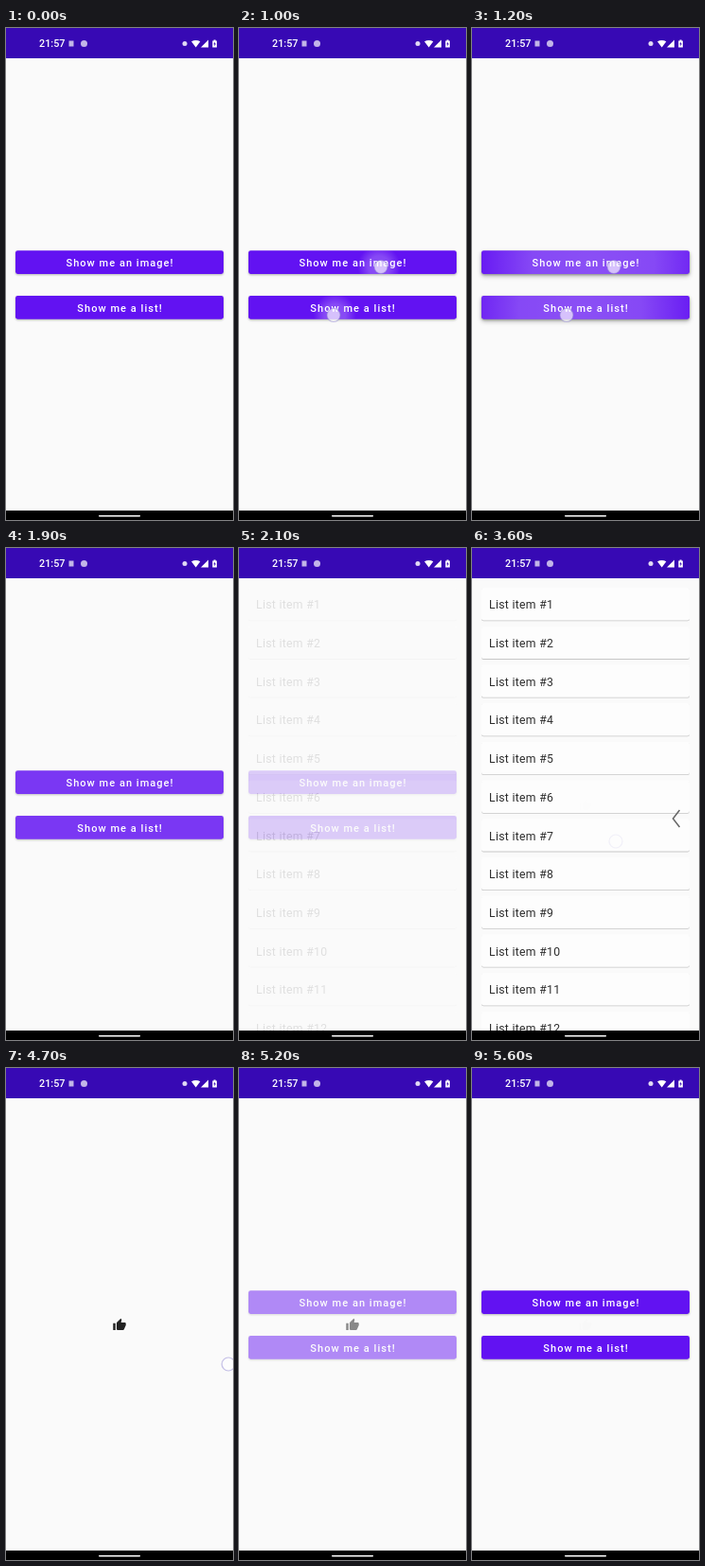
Animation of 240x520 px, one loop 5700 ms. Source, as an HTML page:

```html
<!DOCTYPE html>
<html lang="en">
<head>
<meta charset="utf-8">
<title>Navigation demo</title>
<style>
  html, body { margin: 0; width: 100%; height: 100%; overflow: hidden; background: #fafafa; }
  svg { display: block; width: 240px; height: 520px; font-family: Roboto, sans-serif; }
  .label { font-size: 11.02px; font-weight: 500; letter-spacing: 1.03px; fill: #fff; }
  .item { font-size: 12.24px; letter-spacing: .3px; fill: #222; }
  .rest { filter: blur(1px); opacity: .28; }
  .raised { filter: blur(2.5px); }
  .edge { filter: blur(.7px); opacity: .22; }
  .touch { fill: rgba(255, 255, 255, .65); stroke: rgba(140, 130, 210, .5); stroke-width: 1.2; }
</style>
</head>
<body>
<svg viewBox="0 0 240 520">
  <defs id="defs"></defs>
  <rect width="240" height="520" fill="#fafafa"/>
  <g id="home"></g>
  <g id="image">
    <path transform="translate(112.66 264.2) scale(.612)" fill="#222" d="M1 21h4V9H1v12zm22-11c0-1.1-.9-2-2-2h-6.31l.95-4.57.03-.32c0-.41-.17-.79-.44-1.06L14.17 1 7.59 7.59C7.22 7.95 7 8.45 7 9v10c0 1.1.9 2 2 2h9c.83 0 1.54-.5 1.84-1.22l3.02-7.05c.09-.23.14-.47.14-.73v-2z"/>
  </g>
  <g id="list"></g>
  <g id="pointers"></g>
  <path id="arrow" d="M219.5 277l-7 9 7 9" fill="none" stroke="#666" stroke-width="1.5"/>

  <rect width="240" height="32" fill="#3709b4"/>
  <g fill="#fff">
    <text x="35" y="20.4" font-size="10.8" font-weight="500">21:57</text>
    <rect x="66.5" y="13.5" width="5" height="6" opacity=".7"/>
    <circle cx="82.5" cy="16.5" r="3.5" opacity=".7"/>
    <circle cx="189" cy="16.5" r="2.5" opacity=".85"/>
    <path d="M196 14.2Q200.7 11.6 205.4 14.2L200.7 20.5z"/>
    <path d="M206 20.5h8v-8z"/>
    <path d="M218.3 13.6h1.3v-1h2v1h1.3v7h-4.6z"/>
    <path d="M220.9 14.6l-1.5 2.7h1v2l1.5-2.8h-1z" fill="#3709b4"/>
  </g>
  <rect y="510" width="240" height="10"/>
  <rect x="98" y="514.9" width="44" height="1.5" rx=".7" fill="#fff"/>
</svg>
<script>
const LOOP = 5700, STEP = 100, FADE = 700;
const $ = id => document.getElementById(id);
const clamp = v => Math.max(0, Math.min(1, v));
const ramp = (t, from, to) => clamp((t - from) / (to - from));
const smooth = p => p * p * (3 - 2 * p);

function add(parent, tag, attrs, text = '') {
  const node = document.createElementNS('http://www.w3.org/2000/svg', tag);
  set(node, attrs);
  node.textContent = text;
  return parent.appendChild(node);
}

function set(node, attrs) {
  for (const key in attrs) node.setAttribute(key, attrs[key]);
}

// cubic-bezier(.4, 0, .2, 1)
function fastOutSlowIn(x) {
  let lo = 0, hi = 1;
  for (let i = 0; i < 24; i++) {
    const s = (lo + hi) / 2, r = 1 - s;
    if (1.2 * r * r * s + .6 * r * s * s + s ** 3 < x) lo = s; else hi = s;
  }
  return lo * lo * (3 - 2 * lo);
}
const fade = (t, start) => fastOutSlowIn(ramp(t, start, start + FADE));

const touch = (x, y) => add($('pointers'), 'circle', { class: 'touch', cx: x, cy: y, r: 7 });

function makeButton(id, y, label, touchX, touchY) {
  const box = { x: 10, width: 220, height: 24.7, rx: 2.4 };
  const raised = add($('home'), 'rect', { ...box, y: y + 2.5, class: 'raised' });
  add($('home'), 'rect', { ...box, y: y + 1, class: 'rest' });
  add($('home'), 'rect', { ...box, y, fill: '#6212f2' });
  const glow = add($('defs'), 'radialGradient', { id, gradientUnits: 'userSpaceOnUse' });
  [[0, .26], [.5, .23], [1, 0]].forEach(([offset, opacity]) =>
    add(glow, 'stop', { offset, 'stop-color': '#fff', 'stop-opacity': opacity }));
  const ripple = add($('home'), 'rect', { ...box, y, fill: `url(#${id})` });
  add($('home'), 'text', { x: 120.5, y: y + 16.7, class: 'label', 'text-anchor': 'middle' }, label);
  return { y, raised, glow, ripple, touchX, touchY, pointer: touch(touchX, touchY) };
}

const buttons = [
  makeButton('glowA', 235.2, 'Show me an image!', 150, 252.5),
  makeButton('glowB', 283, 'Show me a list!', 100, 303.5)
];

for (let i = 0; i < 12; i++) {
  const y = 42.2 + i * 40.7, card = { x: 10, width: 220, height: 34.2, rx: 2.2 };
  add($('list'), 'rect', { ...card, y: y + .8, class: 'edge' });
  add($('list'), 'rect', { ...card, y, fill: '#fefefe' });
  add($('list'), 'text', { x: 18, y: y + 22.1, class: 'item' }, `List item #${i + 1}`);
}

const swipes = [
  { start: 3190, release: 3490, y: 310 },
  { start: 4690, release: 4960, y: 313 }
].map(s => ({ ...s, pointer: touch(236, s.y) }));

function drawButton(b, t) {
  const grow = ramp(t, 980, 1280);
  const press = t < 1000 ? 0 : 1 - ramp(t, 1600, 1800);
  set(b.glow, {
    cx: b.touchX + (120 - b.touchX) * grow,
    cy: b.touchY + (b.y + 12.3 - b.touchY) * grow,
    r: 12 + 160 * grow
  });
  set(b.ripple, { opacity: press });
  set(b.raised, { opacity: .35 * press * grow });
  set(b.pointer, { opacity: t < 1000 ? 0 : 1 - ramp(t, 1600, 1750) });
}

function drawSwipe(s, t) {
  const drag = smooth(ramp(t, s.start, s.release));
  const shown = t < s.start ? 0 : 1 - ramp(t, s.release, s.release + 140);
  set(s.pointer, { cx: 235.5 - 83.5 * drag, opacity: shown });
  const enter = ramp(t, s.start + 50, s.start + 200);
  const leave = ramp(t, s.release + 110, s.release + 230);
  if (enter > 0 && leave < 1) {
    set($('arrow'), {
      opacity: enter * (1 - leave),
      transform: `translate(${20 * (1 - enter)} ${s.y - 310})`
    });
  }
}

function draw(t) {
  set($('home'), { opacity: t < 4960 ? 1 - fade(t, 1750) : fade(t, 4960) });
  set($('list'), { opacity: fade(t, 1967) * (1 - fade(t, 3500)) });
  set($('image'), { opacity: fade(t, 3500) * (1 - fade(t, 4960)) });
  set($('arrow'), { opacity: 0 });
  buttons.forEach(b => drawButton(b, t));
  swipes.forEach(s => drawSwipe(s, t));
}

const begin = performance.now();
function tick() {
  const t = (performance.now() - begin) % LOOP;
  draw(Math.floor(t / STEP) * STEP);
  requestAnimationFrame(tick);
}
tick();
</script>
</body>
</html>
```
